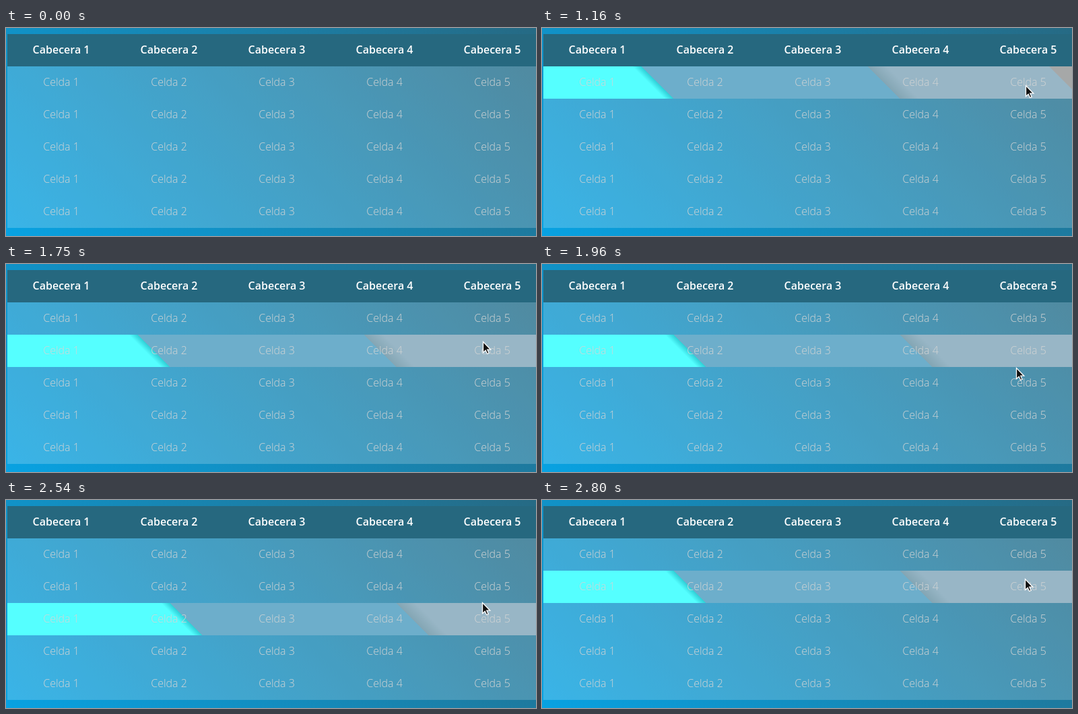
These frames come from a looping animation (787x309 px, 2900 ms). An HTML page with a canvas:

```html
<!DOCTYPE html>
<html lang="es">
<head>
<meta charset="utf-8">
<style>
  html, body { margin: 0; width: 100%; height: 100%; overflow: hidden; }
  canvas { display: block; }
</style>
</head>
<body>
<canvas id="stage" width="787" height="309"></canvas>
<script>
const ctx = document.getElementById('stage').getContext('2d');
const LOOP = 2900, FRAME = 42, LEFT = 2, TOP = 9, ROW = 48, COL = 160;

// Diagonal gradient; each stop is placed by its value of x - y.
function diagonal(...stops) {
  const gradient = ctx.createLinearGradient(0, 309, 548, -239);
  for (const [d, color] of stops) gradient.addColorStop((d + 309) / 1096, color);
  return gradient;
}

const pageFill = diagonal([-309, '#08a2e2'], [787, '#266a84']);
const hoverFill = diagonal(
  [77, '#55ffff'], [90, '#30d0d8'], [91, '#6daecb'],
  [426, '#6daecb'], [427, '#84a6b4'], [455, '#98b6c6'],
  [695, '#98b6c6'], [697, '#a6a8a8']);

const moves = [
  { start: 990, end: 1200, from: [774, 79], to: [711, 86] },
  { start: 1490, end: 2130, from: [711, 86], to: [702, 170] },
  { start: 2368, end: 2800, from: [702, 170], to: [717, 117] }
];
const arrow = new Path2D('M.5 .5V16.5L4.2 13.2L6.6 18.5L9.2 17.4L6.8 12.2H11.8Z');

function pointerAt(t) {
  const move = moves.findLast(m => m.start <= t);
  if (!move) return null;
  const elapsed = Math.floor((t - move.start) / FRAME) * FRAME;
  const p = Math.min(1, elapsed / (move.end - move.start));
  const eased = p * p * (3 - 2 * p);
  return move.from.map((v, i) => Math.round(v + (move.to[i] - v) * eased));
}

// The highlight trails the pointer by one frame.
function hoveredRow(t) {
  const pointer = pointerAt(t - FRAME);
  return pointer ? Math.floor((pointer[1] - TOP) / ROW) : -1;
}

function drawRow(row, hovered) {
  const y = TOP + row * ROW, header = row === 0;
  ctx.fillStyle = header ? '#26687f' : hovered ? hoverFill : 'rgba(255,255,255,.2)';
  ctx.fillRect(LEFT, y, 785, ROW);
  ctx.font = (header ? 600 : 360) + ' 16px "Open Sans", "Noto Sans", sans-serif';
  ctx.fillStyle = header ? '#fff' : '#d2d4d4';
  for (let col = 0; col < 5; col++) {
    ctx.fillText((header ? 'Cabecera ' : 'Celda ') + (col + 1), LEFT + (col + .5) * COL, y + 29);
  }
}

function drawPointer([x, y]) {
  ctx.save();
  ctx.translate(x, y);
  ctx.fillStyle = '#111';
  ctx.fill(arrow);
  ctx.strokeStyle = '#fff';
  ctx.lineWidth = 1.3;
  ctx.stroke(arrow);
  ctx.restore();
}

function draw(t) {
  ctx.fillStyle = pageFill;
  ctx.fillRect(0, 0, 787, 309);
  ctx.textAlign = 'center';
  const current = hoveredRow(t);
  for (let row = 0; row < 6; row++) drawRow(row, row === current);
  const pointer = pointerAt(t);
  if (pointer) drawPointer(pointer);
}

const start = performance.now();
function tick() {
  draw((performance.now() - start) % LOOP);
  requestAnimationFrame(tick);
}
tick();
</script>
</body>
</html>
```
